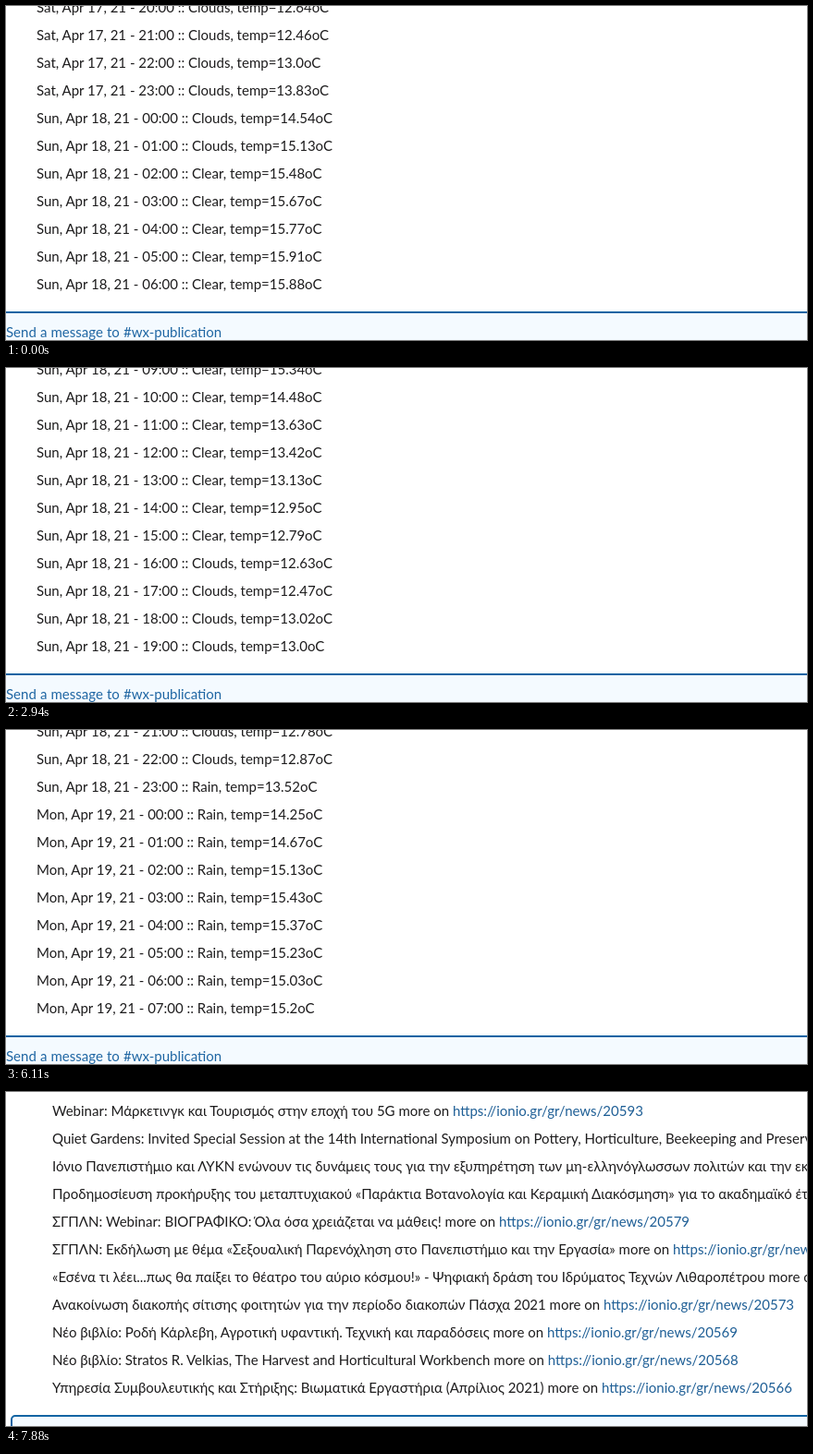
These frames come from a looping animation (866 px wide and 362 px high, 8000 ms). An HTML page:

```html
<!DOCTYPE html>
<html lang="el">
<head>
<meta charset="utf-8">
<title>Channel log</title>
<style>
html, body { margin: 0; width: 100%; height: 100%; overflow: hidden; background: #fff; }
body { font: 15px/30px Lato, sans-serif; color: #1d1c1d; }
.pane { position: absolute; left: 0; top: 0; width: 866px; height: 362px; overflow: hidden; background: #fff; }
.view { position: absolute; left: 0; top: 0; width: 100%; overflow: hidden; }
.row { height: 30px; box-sizing: border-box; white-space: nowrap; }
#hourly .view { height: 316px; }
#hourly .row { padding-left: 33px; }
#news .view { height: 335px; }
#news .row { padding-left: 50px; position: relative; }
.divided::before { content: ""; position: absolute; left: 0; top: 0; width: 100%; height: 1px; background: #e01e5a; }
.link { color: #1f5f96; }
.composer { position: absolute; box-sizing: border-box; width: 900px; height: 60px; background: #f4faff; border: 2px solid #1264a3; color: #1f66a3; white-space: nowrap; }
#hourly .composer { left: -10px; top: 331px; padding: 9px 0 0 8px; line-height: 22px; word-spacing: .3px; }
#news .composer { left: 5px; top: 350px; border-radius: 5px; }
</style>
</head>
<body>
<div class="pane" id="hourly">
  <div class="view"><div class="list"></div></div>
  <div class="composer">Send a message to #wx-publication</div>
</div>
<div class="pane" id="news">
  <div class="view"><div class="list"></div></div>
  <div class="composer"></div>
</div>
<script>
const LOOP = 8000, ROW = 30, VISIBLE = 11, CUT = 6495;

// Times at which the list moves up by one row.
const STEPS = [
  150, 380, 610, 840, 1150, 1360, 1580, 1790,
  2100, 2330, 2530, 2740, 2940, 3250, 3400, 3940,
  4320, 4530, 4740, 4950, 5250, 5460, 5680, 5890, 6110, 6340,
  6650, 6930, 7170, 7400, 7640, 7880
];

const DAYS = ["Sat, Apr 17", "Sun, Apr 18", "Mon, Apr 19"];
const FORECAST = [
  ["Clouds", "12.64 12.46 13.0 13.83 14.54 15.13"],
  ["Clear", "15.48 15.67 15.77 15.91 15.88 15.92 15.72 15.34 14.48 13.63 13.42 13.13 12.95 12.79"],
  ["Clouds", "12.63 12.47 13.02 13.0 13.03 12.78 12.87"],
  ["Rain", "13.52 14.25 14.67 15.13 15.43 15.37 15.23 15.03 15.2 14.88"]
];
const LATE = [["Clear", "13.12 13.34 13.56"]];

const SITE = "https://ionio.gr/gr/news/";
const NEWS = [
  ["ΓΛΚΡ: 3ο Διεθνές Συνέδριο Coastal Pottery & Woodcarving Heritage [CPWH-2021] - Παράταση υποβολής περιλήψεων μέχρι 30 Απριλίου"],
  ["Ηλεκτρονική έρευνα ικανοποίησης χρηστών κατά τη διάρκεια της πανδημίας - ΠΑΡΑΤΑΣΗ ΠΡΟΘΕΣΜΙΑΣ", 20597],
  ["Μελέτη και κατασκευή κτηρίου για τη στέγαση του Τμήματος Περιφερειακής Ανάπτυξης του Ιονίου Πανεπιστημίου στη Λευκάδα"],
  ["Webinar: Μάρκετινγκ και Τουρισμός στην εποχή του 5G", 20593],
  ["Quiet Gardens: Invited Special Session at the 14th International Symposium on Pottery, Horticulture, Beekeeping and Preservation"],
  ["Ιόνιο Πανεπιστήμιο και ΛΥΚΝ ενώνουν τις δυνάμεις τους για την εξυπηρέτηση των μη-ελληνόγλωσσων πολιτών και την εκπαίδευση"],
  ["Προδημοσίευση προκήρυξης του μεταπτυχιακού «Παράκτια Βοτανολογία και Κεραμική Διακόσμηση» για το ακαδημαϊκό έτος 2021"],
  ["ΣΓΠΛΝ: Webinar: ΒΙΟΓΡΑΦΙΚΟ: Όλα όσα χρειάζεται να μάθεις!", 20579],
  ["ΣΓΠΛΝ: Εκδήλωση με θέμα «Σεξουαλική Παρενόχληση στο Πανεπιστήμιο και την Εργασία»", 20577],
  ["«Εσένα τι λέει...πως θα παίξει το θέατρο του αύριο κόσμου!» - Ψηφιακή δράση του Ιδρύματος Τεχνών Λιθαροπέτρου", 20575],
  ["Ανακοίνωση διακοπής σίτισης φοιτητών για την περίοδο διακοπών Πάσχα 2021", 20573],
  ["Νέο βιβλίο: Ροδή Κάρλεβη, Αγροτική υφαντική. Τεχνική και παραδόσεις", 20569],
  ["Νέο βιβλίο: Stratos R. Velkias, The Harvest and Horticultural Workbench", 20568],
  ["Υπηρεσία Συμβουλευτικής και Στήριξης: Βιωματικά Εργαστήρια (Απρίλιος 2021)", 20566]
];

function addRow(list, text, id) {
  const row = document.createElement("div");
  row.className = "row";
  row.textContent = id ? text + " more on " : text;
  if (id) {
    const link = document.createElement("span");
    link.className = "link";
    link.textContent = SITE + id;
    row.append(link);
  }
  list.append(row);
  return row;
}

function addForecast(list, groups, hour) {
  for (const [sky, temps] of groups)
    for (const temp of temps.split(" ")) {
      const clock = String(hour % 24).padStart(2, "0");
      addRow(list, `${DAYS[Math.floor(hour / 24)]}, 21 - ${clock}:00 :: ${sky}, temp=${temp}oC`);
      hour++;
    }
}

const hourly = document.querySelector("#hourly .list");
const newsPane = document.querySelector("#news");
const news = newsPane.querySelector(".list");

addForecast(hourly, FORECAST, 20);
addForecast(news, LATE, 48 + 21);
NEWS.forEach(([text, id], i) => {
  const row = addRow(news, text, id);
  if (i === 0) row.classList.add("divided");
});

const scrollRows = (list, top, rows) => {
  list.style.transform = `translateY(${top - rows * ROW}px)`;
};

function draw(t) {
  const moved = STEPS.filter(s => s <= t).length;
  const inNews = t >= CUT;
  newsPane.style.visibility = inNews ? "visible" : "hidden";
  if (inNews) {
    const last = news.children.length - VISIBLE;
    scrollRows(news, 5, last - (STEPS.length - moved));
  } else {
    scrollRows(hourly, -14, moved);
  }
}

const start = performance.now();
function tick() {
  draw((performance.now() - start) % LOOP);
  requestAnimationFrame(tick);
}
tick();
</script>
</body>
</html>
```
